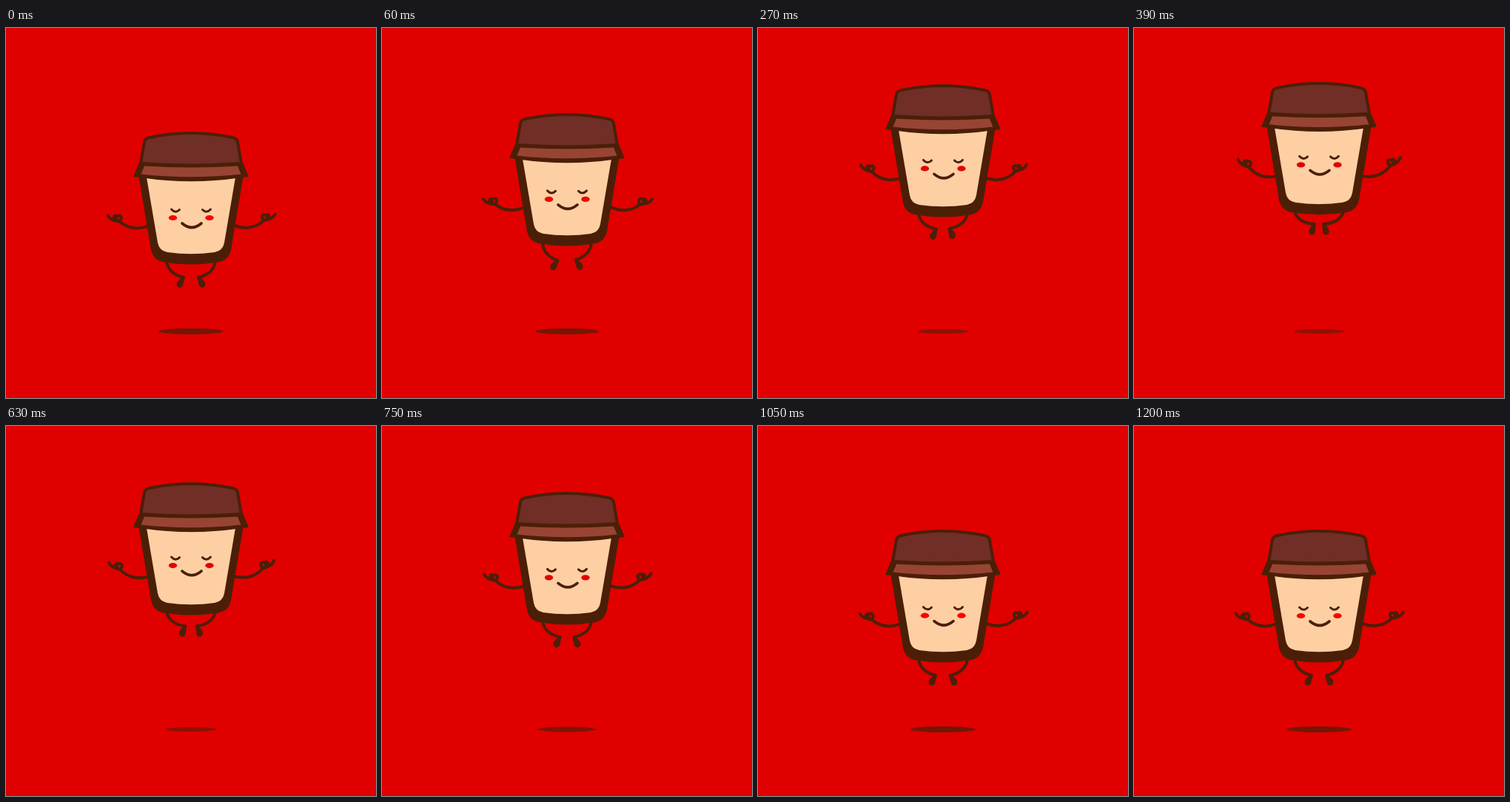
Animation, 500 px wide and 500 px high, one loop 1470 ms. Source, as an HTML page:

```html
<!DOCTYPE html>
<html lang="en">
<head>
<meta charset="utf-8">
<title>Floating coffee cup</title>
<style>
  html, body { margin: 0; height: 100%; overflow: hidden; background: #e00000; }
  svg { display: block; width: 100vw; height: 100vh; }
  .line { fill: none; stroke: #4b1f07; stroke-width: 4; stroke-linecap: round; stroke-linejoin: round; }
  .dark { fill: #4b1f07; }
</style>
</head>
<body>
<svg viewBox="0 0 500 500">
  <defs>
    <g id="arm">
      <path class="line" d="M195 266C181 273 165 272 153 261Q142 261 137.500 253.500"/>
      <path class="line" stroke-width="3" d="M153 261C158 257 155 252 151 254S149 262 153 261M146 259Q145 255 148 253.500"/>
    </g>
    <g id="leg">
      <path class="line" d="M217 313C217 326 227 334 240 337"/>
      <path class="dark" d="M237 337L242 336.500L239 348Q237 352 233 350.500Q229 348 231.500 343Z"/>
    </g>
  </defs>
  <ellipse id="shadow" class="dark" cx="250" cy="410"/>
  <g id="cup">
    <use id="armL" href="#arm"/>
    <g transform="matrix(-1 0 0 1 502 0)"><use id="armR" href="#arm"/></g>
    <use id="legL" href="#leg"/>
    <g transform="matrix(-1 0 0 1 500 0)"><use id="legR" href="#leg"/></g>
    <path class="dark" d="M179 198L196 300Q199 313 211 316Q250 323 289 316Q301 313 304 300L321 198Z"/>
    <path fill="#ffcfa4" d="M190 202L205 290Q207 301 218 303Q250 307.500 282 303Q293 301 295 290L310 202Z"/>
    <path class="dark" d="M180 182L172 201L185 202.500Q250 212 315 202.500L328 201L320 182Z"/>
    <path fill="#974434" d="M187 186.500Q250 190.500 313 186.500L317.500 197.500Q250 205 182.500 197.500Z"/>
    <path class="line" style="fill:#702e26" d="M182 183L187 154Q188 149 194 148Q250 136 306 148Q312 149 313 154L318 183Q250 188 182 183Z"/>
    <g id="face">
      <g id="cheeks">
        <ellipse cx="225.500" cy="256.500" rx="5.700" ry="3.600"/>
        <ellipse cx="275" cy="256.500" rx="5.700" ry="3.600"/>
      </g>
      <path class="line" style="stroke-width:3" d="M223.500 245Q229 251 234.500 245.500M265.500 245.500Q271 251 276.500 245"/>
      <path class="line" style="stroke-width:3.700" d="M238 264Q251 275 264 264"/>
    </g>
  </g>
</svg>
<script>
const LOOP = 1470, RISE_START = 20, LANDING = 870, HEIGHT = 68.2;
const el = Object.fromEntries([...document.querySelectorAll('[id]')].map(e => [e.id, e]));

// Secondary motion: values at these times, joined by smooth curves
const times =    [0, 80, 150, 390, 630, 750, 870, 1200];
const tracks = {
  armL: [0, -3.5, -2, 9.5, 5.3, 2, 0.3, 0],
  armR: [2, -4.5, -4, 12.5, 8, 3.2, 2.2, 2],
  legL: [0, -8, -8, 11.5, 6.5, 2, 0.5, 0],
  legR: [0, -5, -4, 11.5, 6.5, 2, 0.5, 0],
  face: [0, 0, 0, 4.5, 4, 0.6, 0.8, 0]
};

function sample(values, t) {
  const last = times.length - 1;
  if (t >= times[last]) return values[last];
  const i = times.findIndex(x => x > t) - 1;
  const slope = k => k <= 0 || k >= last ? 0 :
    (values[k + 1] - values[k - 1]) / (times[k + 1] - times[k - 1]);
  const span = times[i + 1] - times[i], u = (t - times[i]) / span, v = 1 - u;
  return values[i] * v * v * (1 + 2 * u) + values[i + 1] * u * u * (1 + 2 * v)
    + span * u * v * (slope(i) * v - slope(i + 1) * u);
}

const smooth = u => u * u * (3 - 2 * u);
const clamp = u => Math.max(0, Math.min(1, u));

function draw(t) {
  const up = Math.max(0, t - RISE_START), down = Math.max(0, LANDING - t);
  const lift = 1 - Math.max(Math.exp(-0.0112 * up), Math.exp(-0.0116 * down));
  const fade = smooth(clamp(Math.min(up, down) / 265));
  const move = (node, y) => node.setAttribute('transform', `translate(0 ${y})`);
  const turn = (name, angle, x, y) => el[name].setAttribute('transform', `rotate(${angle} ${x} ${y})`);
  const at = name => sample(tracks[name], t);

  move(el.cup, -HEIGHT * lift);
  move(el.face, -at('face'));
  for (const side of 'LR') {
    turn('arm' + side, at('arm' + side), 192, 268);
    turn('leg' + side, -at('leg' + side), 217, 316);
  }
  el.cheeks.setAttribute('fill', `rgb(${252 - 28 * lift},0,0)`);
  el.shadow.setAttribute('rx', 44 - 10.5 * fade);
  el.shadow.setAttribute('ry', 4 - fade);
  el.shadow.setAttribute('opacity', 0.72 - 0.17 * fade);
}

const start = performance.now();
function frame() {
  draw((performance.now() - start) % LOOP);
  requestAnimationFrame(frame);
}
frame();
</script>
</body>
</html>
```
